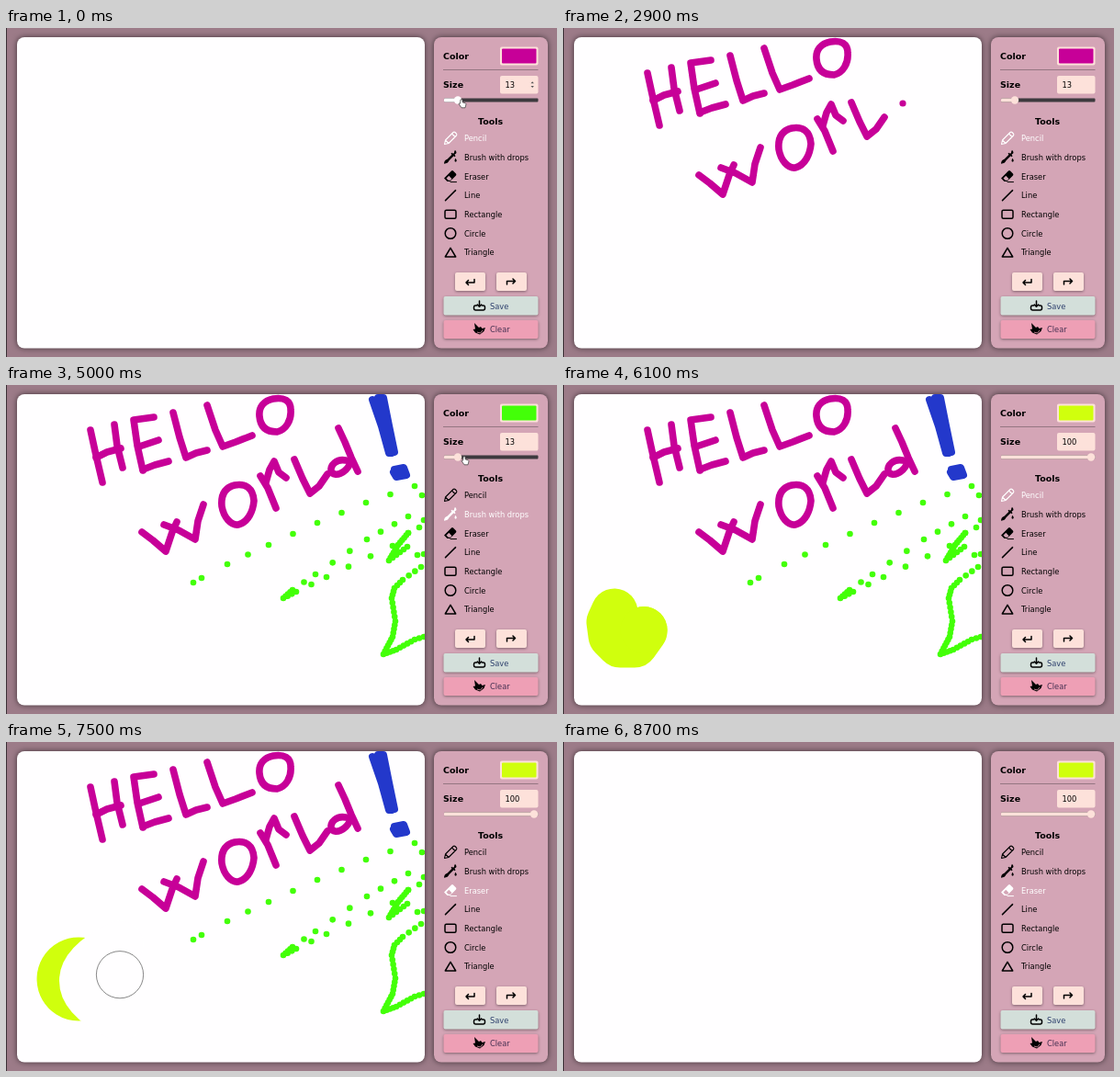
An HTML page for the animation above (8800 ms loop, 600x358 px).

```html
<!DOCTYPE html>
<html lang="en">
<head>
<meta charset="utf-8">
<title>Paint</title>
<style>
html, body { margin: 0; width: 100%; height: 100%; overflow: hidden; background: #9c7b88; }
svg { display: block; width: 100%; height: 100%; font: 8.3px "DejaVu Sans", Verdana, sans-serif; }
.card { filter: drop-shadow(0 0 3px #0009); }
.btn { filter: drop-shadow(0 1.5px 1.5px #0006); }
.head { font-weight: 700; font-size: 9.5px; }
.line { fill: none; stroke: currentColor; stroke-width: 1.5; stroke-linecap: round; stroke-linejoin: round; }
.ink { fill: none; stroke-linecap: round; stroke-linejoin: round; }
</style>
</head>
<body>
<svg viewBox="0 0 600 358" preserveAspectRatio="none">
  <defs><clipPath id="page"><rect x="12" y="10" width="444" height="338.5" rx="8"/></clipPath></defs>
  <rect width="600" height="358" fill="#9c7b88"/>
  <rect width="1" height="358" fill="#3a3035"/>
  <rect class="card" x="12" y="10" width="444" height="338.5" rx="8" fill="#fffeff"/>
  <g clip-path="url(#page)"><g id="art"></g><circle id="tip"/></g>

  <rect class="card" x="466" y="10" width="124" height="338.5" rx="8" fill="#d4a5b6"/>
  <text class="head" x="476" y="34">Color</text>
  <rect x="538" y="20.5" width="41.5" height="20" rx="2" fill="#fde1da"/>
  <rect id="swatch" x="540" y="22.5" width="37.5" height="16" rx="1"/>
  <path d="M476 45.5H579.5" stroke="#957682" stroke-width="1.2"/>
  <text class="head" x="476" y="65">Size</text>
  <rect x="538" y="52" width="41.5" height="19.5" rx="2" fill="#fde1da"/>
  <text id="size" x="543.5" y="65"></text>
  <path id="spin" d="M571.5 60.3l1.7-2 1.7 2zM571.5 63l1.7 2 1.7-2z" fill="#555"/>
  <rect x="477" y="76.5" width="102.5" height="4" rx="1" fill="#3d3a3e"/>
  <rect id="fill" x="477" y="76.5" height="4" rx="1"/>
  <circle id="thumb" cy="78.5" r="4.2"/>
  <text class="head" x="514" y="104.5">Tools</text>
  <g id="tools"></g>

  <g class="btn">
    <rect x="489" y="266" width="33" height="20" rx="2" fill="#fde1da"/>
    <rect x="534" y="266" width="33" height="20" rx="2" fill="#fde1da"/>
    <rect x="476.5" y="292" width="103" height="20.5" rx="2" fill="#d3dfda"/>
    <rect x="476.5" y="318" width="103" height="20" rx="2" fill="#ee9fb5"/>
  </g>
  <path class="line" d="M510 273.500v3.500h-9m2.500-2.500l-2.500 2.500 2.500 2.500M545.500 279v-3.500h9m-2.500-2.500l2.500 2.500-2.500 2.500"/>
  <path class="line" d="M515.500 297v6m-2.200-2l2.200 2.300 2.200-2.300M512.500 302h-1.500q-1.500 0-1.500 2v1q0 2 2 2h8q2 0 2-2v-1q0-2-1.500-2h-1.500"/>
  <text x="527" y="305.500" fill="#2f416e">Save</text>
  <path d="M510 321l5 5 2-1 1.500 2 3.500-1-1.500 4-4.500 3.500-5-2-2.500-3.500 2.500-.500z"/>
  <path d="M513 331l3.500 1 2.500-3" fill="none" stroke="#ee9fb5" stroke-width=".8"/>
  <text x="527" y="331" fill="#443052">Clear</text>
  <path id="hand" d="M-1-4q1.200-1 2 0l.3 3 3 .8q1 .6.500 2l-.8 3h-4l-2.800-4q-.3-1.300 1.300-.6z" fill="#fff" stroke="#333" stroke-width=".7"/>
</svg>
<script>
const LOOP = 8800, STEP = 100, CLEARED = 8600;
const PINK = '#c70098', BLUE = '#2338cb', GREEN = '#43ff08', LIME = '#d0ff0d', PAPER = '#fffeff';
const PEN = 7.6, WIDE = 51;
const $ = id => document.getElementById(id);
const clamp = v => Math.max(0, Math.min(1, v));
const mix = (a, b, p) => a + (b - a) * p;

function add(parent, tag, attrs) {
  const el = document.createElementNS('http://www.w3.org/2000/svg', tag);
  set(el, attrs);
  parent.append(el);
  return el;
}
function set(el, attrs) {
  for (const k in attrs) el.setAttribute(k, attrs[k]);
}
const show = (el, on) => { el.style.display = on ? '' : 'none'; };

// Value of a step list [[time, value], ...] at time t
const at = (list, t) => list.filter(s => s[0] <= t).pop()[1];

const toolIcons = [
  ['Pencil', '<path class="line" style="stroke-width:1.1" d="M-6.500 6.500l1-4.500 8.500-8.500q1-.800 2 0l1.500 1.500q.800 1 0 2l-8.500 8.500zM-5.500 2l3.500 3.500M1.500-5l3.500 3.500"/>'],
  ['Brush with drops', '<path d="M-7 7q0-4 3.500-5l5-5-1-1 1-1 1.500 1 1.500-1.500q1.500-.500 1.500 1l-1.500 1.500 1 1.500-1 1-1-1-5 5q-1 3-5.500 3.500zM5-8q3 3.500 0 4.500-2-1 0-4.500zM5.500 1q2.500 3 0 4-2-1 0-4z"/>'],
  ['Eraser', '<path fill-rule="evenodd" d="M-6.500 1.500l7.500-7.500q1-.800 2 0l3 3q.800 1 0 2l-6.500 6.500h-3l-3-3q-.800-.500 0-1zM-4.500 2l2.200 2.300h2.300l1.500-1.500-3.200-3.500z"/><path d="M0 6.200h6.500" class="line" style="stroke-width:1"/>'],
  ['Line', '<path class="line" d="M-5.500 5.500l11-11"/>'],
  ['Rectangle', '<rect class="line" x="-6" y="-4.500" width="12" height="9" rx="1.500"/>'],
  ['Circle', '<circle class="line" r="5.800"/>'],
  ['Triangle', '<path class="line" d="M0-4.800l5.700 9.600h-11.400z"/>']
];
const tools = toolIcons.map(([name, icon], i) => {
  const y = 120 + i * 20.7;
  const g = add($('tools'), 'g', { fill: 'currentColor' });
  add(g, 'g', { transform: `translate(484 ${y})` }).innerHTML = icon;
  add(g, 'text', { x: 499, y: y + 3.2 }).textContent = name;
  return g;
});

// Settings over time
const colors = [[0, PINK], [3500, BLUE], [4200, GREEN], [5500, LIME]];
const picked = [[0, 0], [4300, 1], [5600, 0], [6500, 2], [6900, 0], [7200, 2]];
const sizeAt = t => Math.round(mix(13, 100, clamp((t - 5000) / 400)));

// Pen moves: start, end, colour ('none' hovers), width, path, time of undo
const moves = [
  [200, 300, 'none', PEN, 'M130 80L92 49'],
  [300, 500, PINK, PEN, 'M92 49L97 72 105 106'],
  [500, 650, PINK, PEN, 'M118 43L121 66 127 90'],
  [650, 750, PINK, PEN, 'M98 79L110 73 125 69'],
  [800, 950, PINK, PEN, 'M161 35L139 38 143 66 149 93'],
  [950, 1000, PINK, PEN, 'M149 92L162 87 177 83'],
  [1050, 1100, PINK, PEN, 'M145 67L166 60'],
  [1150, 1300, PINK, PEN, 'M182 30L189 57 196 79 207 74 219 71'],
  [1350, 1500, PINK, PEN, 'M219 22L228 49 236 67 250 62 268 55'],
  [1550, 1650, 'none', PEN, 'M268 40L275 17 279 16'],
  [1700, 1900, PINK, PEN, 'M291 15C281 17 275 24 276 34C277 46 284 51 295 51C305 49 311 38 310 27C310 17 303 13 291 15'],
  [2050, 2200, PINK, PEN, 'M148 160L160 169 174 181 181 160 186 149'],
  [2200, 2300, PINK, PEN, 'M172 152L188 158 206 168 209 148 215 130'],
  [2350, 2500, PINK, PEN, 'M249 109C237 112 234 121 235 132C237 144 245 153 253 152C264 149 269 137 270 126C269 112 261 107 249 109'],
  [2530, 2600, PINK, PEN, 'M277 99L285 112 294 134'],
  [2600, 2690, PINK, PEN, 'M283 106L287 92 292 83 297 95 305 101'],
  [2720, 2840, PINK, PEN, 'M314 81L323 102 331 118 341 110 350 97'],
  [2900, 3050, PINK, PEN, 'M370 82C360 80 353 87 354 94C358 101 370 96 375 85'],
  [3080, 3200, PINK, PEN, 'M362 47L369 62 376 79 383 94'],
  [3600, 3850, BLUE, 8, 'M399 16L409 45 417 74 423 73 417 44 411 14 405 14 413 45 420 74'],
  [3900, 4050, BLUE, 8, 'M423 92L433 90 436 98 425 100 422 95 434 95'],
  [4300, 4900, 'drops'],
  [5700, 5800, 'none', WIDE, 'M110 240L56 247'],
  [5800, 6300, LIME, WIDE, 'M56 247L51 258 53 273 62 282 78 282 88 268 88 256 80 244 62 244Z', 6900],
  [6500, 6800, 'none', WIDE, 'M190 200L110 230'],
  [6850, 6950, 'none', WIDE, 'M110 230L79 238'],
  [6950, 7200, LIME, WIDE, 'M79 238a20 20 0 1 0 .1 0Z'],
  [7250, 7550, PAPER, WIDE, 'M124 220C70 246 70 274 124 300Z'],
  [7650, 7900, PAPER, WIDE, 'M455 275L412 292 420 260 425 230 452 216'],
  [7950, 8300, PAPER, WIDE, 'M458 152L428 143 396 165 360 198 320 224 284 234'],
  [8300, 8500, 'none', WIDE, 'M284 234L490 328']
].map(([from, to, color, width, d, undo = CLEARED]) => {
  if (color === 'drops') return { from, to, dots: makeDrops() };
  const el = add($('art'), 'path', {
    class: 'ink', d, stroke: color, 'stroke-width': width, pathLength: 1, 'stroke-dasharray': '1 2'
  });
  return { from, to, undo, el, length: el.getTotalLength() };
});

// Trail corners: x, y, number of drops on the way there
function makeDrops() {
  const trail = [
    [204, 215, 1], [213, 210, 1], [241, 195, 1], [286, 174, 2], [339, 150, 2], [392, 128, 2],
    [445, 110, 2], [453, 120, 1], [450, 155, 1], [438, 143, 1], [393, 168, 3], [337, 206, 3],
    [312, 223, 2], [302, 232, 4], [316, 225, 3], [349, 209, 2], [421, 175, 3], [455, 147, 2],
    [438, 161, 1], [427, 174, 5], [417, 191, 6], [437, 176, 5], [448, 185, 1], [455, 184, 1],
    [452, 198, 1], [432, 212, 3], [423, 221, 3], [420, 232, 3], [424, 257, 5], [421, 274, 4],
    [411, 293, 6], [425, 288, 4], [445, 277, 5], [455, 274, 2]
  ];
  const dots = [];
  let [px, py] = trail[0];
  for (const [x, y, n] of trail) {
    for (let i = 1; i <= n; i++) {
      const cx = mix(px, x, i / n), cy = mix(py, y, i / n);
      dots.push({ x: cx, y: cy, el: add($('art'), 'circle', { cx, cy, r: 3.3, fill: GREEN }) });
    }
    [px, py] = [x, y];
  }
  return dots;
}

function pointOn(m, p) {
  return m.dots ? m.dots[Math.round(p * (m.dots.length - 1))] : m.el.getPointAtLength(m.length * p);
}

function tipAt(t) {
  const next = moves.findIndex(m => m.to >= t);
  if (next < 0) return null;
  const m = moves[next], prev = moves[next - 1];
  if (t >= m.from) return pointOn(m, (t - m.from) / (m.to - m.from));
  if (!prev || m.from - prev.to > 250) return null;
  const a = pointOn(prev, 1), b = pointOn(m, 0), p = (t - prev.to) / (m.from - prev.to);
  return { x: mix(a.x, b.x, p), y: mix(a.y, b.y, p) };
}

function draw(t) {
  for (const m of moves) {
    const p = clamp((t - m.from) / (m.to - m.from));
    if (m.dots) {
      m.dots.forEach((d, i) => show(d.el, t < CLEARED && p > 0 && i < p * m.dots.length));
    } else {
      show(m.el, p > 0 && t < m.undo);
      set(m.el, { 'stroke-dashoffset': 1 - p });
    }
  }

  const color = at(colors, t), tool = at(picked, t), size = sizeAt(t);
  const eraser = tool === 2, tip = tipAt(t);
  show($('tip'), tip);
  if (tip) set($('tip'), {
    cx: tip.x, cy: tip.y, r: size === 13 ? 3.6 : 25.6,
    fill: eraser ? PAPER : color, stroke: eraser ? '#555' : 'none', 'stroke-width': .7
  });

  const x = 479.6 + .954 * size, grab = t < 100;
  const light = grab ? '#fff' : '#fde1da';
  set($('swatch'), { fill: color });
  $('size').textContent = size;
  set($('fill'), { width: size === 100 ? 102.5 : x - 477, fill: light });
  set($('thumb'), { cx: x, fill: light });
  show($('spin'), grab);
  tools.forEach((g, i) => { g.style.color = i === tool ? '#fff' : '#000'; });
  show($('hand'), grab || t >= 4950 && t <= 5400);
  set($('hand'), { transform: `translate(${x + (grab ? 4 : 7)} 82)` });
}

function frame() {
  draw(Math.floor(performance.now() % LOOP / STEP) * STEP);
  requestAnimationFrame(frame);
}
frame();
</script>
</body>
</html>
```
